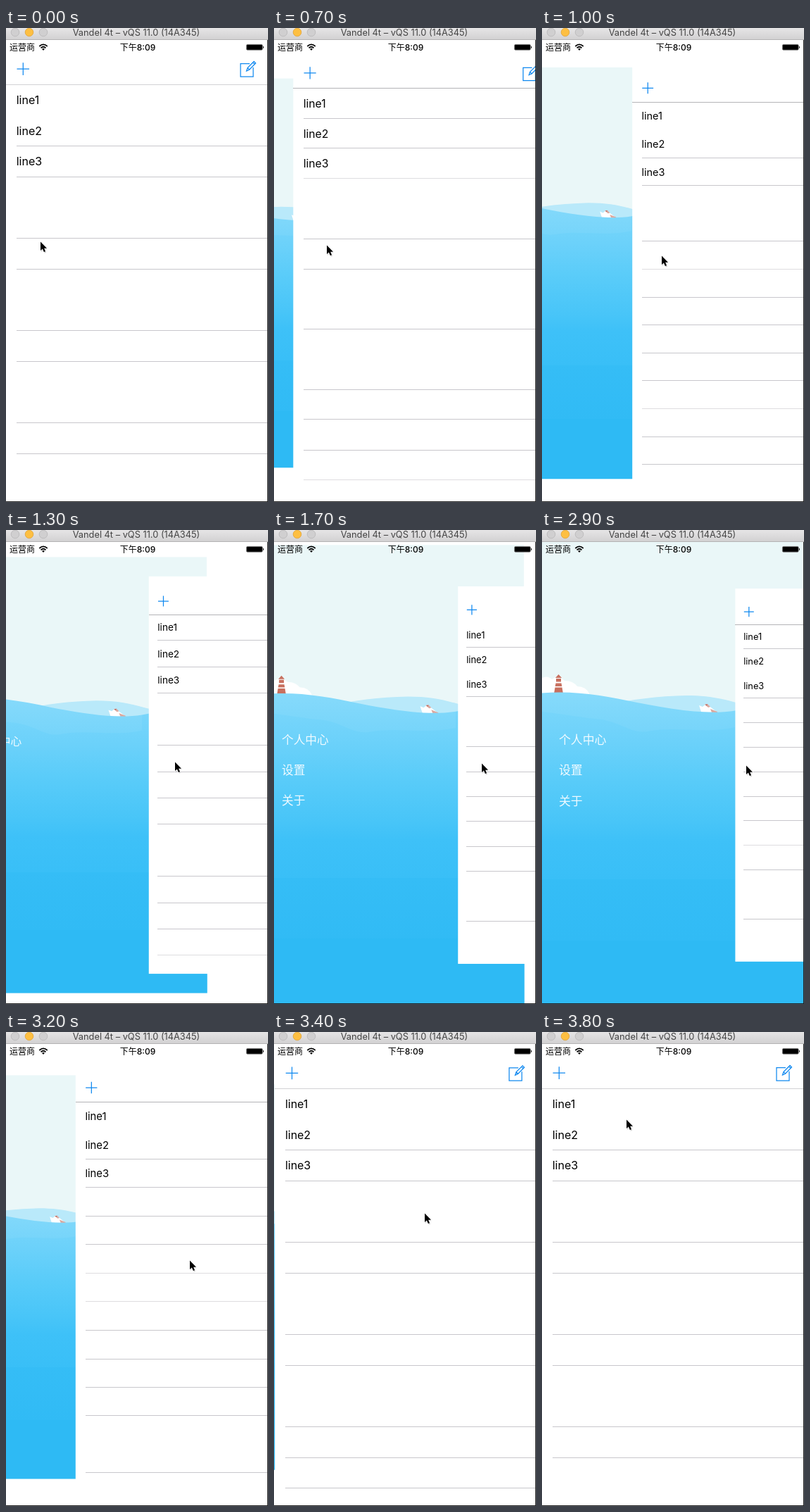
Write an HTML page that moves like this. It is 372 by 673 pixels and loops after 3900 ms.

```html
<!DOCTYPE html>
<html lang="zh">
<head>
<meta charset="utf-8">
<title>Side menu</title>
<style>
html, body { margin: 0; width: 100%; height: 100%; overflow: hidden; background: #fff; }
svg { display: block; font-family: Inter, 'Noto Sans CJK SC', 'Noto Sans CJK', sans-serif; }
.menu { font-size: 16.87px; font-weight: 300; fill: #f0faff; }
.rows { font-size: 16px; }
.icon { fill: none; stroke: #1089f0; stroke-width: 1.25; vector-effect: non-scaling-stroke; }
</style>
</head>
<body>
<svg width="372" height="673" viewBox="0 0 372 673">
  <defs>
    <linearGradient id="bar" x2="0" y2="1">
      <stop stop-color="#e6e5e6"/><stop offset="1" stop-color="#d1d0d1"/>
    </linearGradient>
    <linearGradient id="sea" gradientUnits="userSpaceOnUse" x1="0" y1="230" x2="0" y2="680">
      <stop stop-color="#7fd8fb"/>
      <stop offset=".16" stop-color="#6bd1fa"/>
      <stop offset=".27" stop-color="#5accf9"/>
      <stop offset=".41" stop-color="#48c5f8"/>
      <stop offset=".47" stop-color="#3ec1f8"/>
      <stop offset=".591" stop-color="#39bff7"/>
      <stop offset=".591" stop-color="#35bdf6"/>
      <stop offset=".784" stop-color="#31bbf5"/>
      <stop offset=".784" stop-color="#2ebaf4"/>
      <stop offset="1" stop-color="#2ebaf4"/>
    </linearGradient>
  </defs>
  <rect width="372" height="673" fill="#fff"/>

  <g id="left">
    <rect y="17" width="372.2" height="662" fill="#eaf7f8"/>
    <path fill="#fff" d="M0 240V210Q8 206 14 212Q22 205 32 214Q44 214 50 222Q62 222 67 232V240Z"/>
    <path fill="#c8705f" d="M23.500 205L28 210H19ZM20 211H27V215.500H20ZM19.500 217.500H27.500L28.300 222H18.700ZM18.500 223.500H28.500L30 232.500H17Z"/>
    <path fill="#b9e9fa" d="M90 250C125 240 165 236 205 235C235 235 255 239 279 246C310 254 340 258 373 252V290H90Z"/>
    <path fill="#fff" d="M223 249L228 251L233 247L240 252L249 259L246 261H227Z"/>
    <path fill="#dca99f" d="M231 248L235 247L239 251L236 252ZM239 254L249 258V260L241 259Z"/>
    <path fill="#b6645a" d="M231.500 247.500L235 247.500L234 249.500Z"/>
    <path fill="url(#sea)" d="M0 231.500C45 227.500 90 235 135 245C180 254 235 263 274 256.500C310 250 340 240 373 240V679H0Z"/>
    <path fill="#fff" opacity=".05" d="M0 231.500C45 227.500 90 235 135 245C180 254 235 263 274 256.500V280C230 290 190 278 150 286C125 290 110 270 75 268C55 266 35 262 0 258Z"/>
    <g class="menu">
      <text x="24" y="303.500">个人中心</text>
      <text x="24" y="347">设置</text>
      <text x="24" y="390.500">关于</text>
    </g>
  </g>

  <g id="main">
    <rect y="17" width="374" height="662" fill="#fff"/>
    <path class="icon" d="M15.500 58.200H33M24.300 49.300V67"/>
    <path class="icon" d="M346 50.500H333V69H351V56M341.500 61L343 56.500L352 47.500L354.500 50L345.500 59.200ZM343 56.500L345.500 59.200M350.500 49L353 51.500"/>
    <g class="rows">
      <text x="14.700" y="108">line1</text>
      <text x="14.700" y="151.700">line2</text>
      <text x="14.700" y="195.300">line3</text>
    </g>
  </g>
  <g id="rules" shape-rendering="crispEdges"></g>

  <text x="5" y="31.700" font-size="12">运营商</text>
  <path fill="none" stroke="#000" stroke-width="1.7" d="M47.300 26Q53 20.800 58.700 26M49.500 28.300Q53 25.200 56.500 28.300"/>
  <path d="M51 29.800Q53 28.200 55 29.800L53 32Z"/>
  <text x="187" y="31.700" font-size="12" font-weight="500" text-anchor="middle">下午8:09</text>
  <rect x="341.400" y="23.400" width="22.800" height="7.800" rx="1.500" stroke="#777" stroke-width=".8"/>
  <path d="M365 25.500Q367 27.300 365 29.200Z"/>

  <rect width="372" height="17" fill="url(#bar)"/>
  <rect y="16" width="372" height="1" fill="#b4b3b4"/>
  <g fill="#d0cfd0" stroke="#b8b7b8" stroke-width=".8">
    <circle cx="13" cy="6" r="5.800"/>
    <circle cx="33" cy="6" r="5.800" fill="#fdbf42" stroke="#e0a336"/>
    <circle cx="53" cy="6" r="5.800"/>
  </g>
  <text x="185" y="11" font-size="12.800" fill="#444" text-anchor="middle">Vandel 4t – vQS 11.0 (14A345)</text>
  <path d="M371.500 17V673M0 672.500H372" stroke="#222" fill="none"/>

  <g id="cursor">
    <path d="M1 2V16L4 13L6.500 18L9 17L6.600 12H11Z" opacity=".18"/>
    <path d="M0 0V14L3.200 11.200L5.400 16.200L7.900 15.200L5.700 10.200H10Z" stroke="#fff" stroke-width="1.600" paint-order="stroke"/>
  </g>
</svg>
<script>
const LOOP = 3900, STEP = 100;
const TOP = 17, MID = 348, HALF = 186, OPEN = 274.4, INSET = 14.9;
const DENSITY = 2.0153; // device pixels per stage pixel

// pointer after the drag: time, x, y
const pointer = [
  [2000, 306, 331], [2300, 70, 298], [2600, 46, 372], [2900, 289, 334],
  [3000, 289, 334], [3200, 260, 324], [3800, 119, 124]
];

const el = id => document.getElementById(id);
const clamp = v => Math.min(1, Math.max(0, v));
const easeOut = (t, from, to) => 1 - (1 - clamp((t - from) / (to - from))) ** 2;

const rules = Array.from({ length: 14 }, () => {
  const r = document.createElementNS('http://www.w3.org/2000/svg', 'rect');
  r.setAttribute('height', 1);
  return el('rules').appendChild(r);
});

function place(id, x, s, originX) {
  el(id).setAttribute('transform',
    `translate(${x} ${MID}) scale(${s}) translate(${-originX} ${-MID})`);
}

// One-device-pixel lines fade out where they fall between stage pixels.
function drawRule(r, k, x, s) {
  const row = Math.floor(667 + (k ? 88 * k - 539.5 : -538.5) * s - 0.02);
  const y = row / DENSITY, gap = Math.abs(y % 1 - 0.61);
  const left = Math.round(x + (k ? INSET * s : 0));
  r.setAttribute('x', left);
  r.setAttribute('y', TOP + Math.floor(y));
  r.setAttribute('width', 371 - left);
  r.setAttribute('fill', k ? '#c8c7cc' : '#b4b4b7');
  r.setAttribute('opacity', gap < 0.09 ? 0 : gap < 0.16 ? 0.6 : 1);
}

function pointerAt(t, x) {
  const i = pointer.findIndex(p => p[0] > t);
  if (i === 0) return [48 + 0.94 * x, 331 - 28 * (1 - x / OPEN) ** 2];
  if (i < 0) return pointer[pointer.length - 1].slice(1);
  const a = pointer[i - 1], b = pointer[i], k = (t - a[0]) / (b[0] - a[0]);
  return [1, 2].map(n => a[n] + (b[n] - a[n]) * k);
}

function draw(t) {
  const x = OPEN * (easeOut(t, 630, 2000) - easeOut(t, 3050, 3425));
  const s = 1 - 0.2 * x / OPEN;
  const rest = OPEN - x, back = rest * (1.16 - 0.00155 * rest);
  place('main', x, s, 0);
  place('left', HALF - back, 1 - 0.00086 * back, HALF);
  rules.forEach((r, k) => drawRule(r, k, x, s));

  const [px, py] = pointerAt(t, x).map(Math.round);
  el('cursor').setAttribute('transform', `translate(${px + 1} ${py + 0.5}) scale(.9)`);
}

function tick() {
  draw(Math.floor(performance.now() % LOOP / STEP) * STEP);
  requestAnimationFrame(tick);
}
tick();
</script>
</body>
</html>
```
